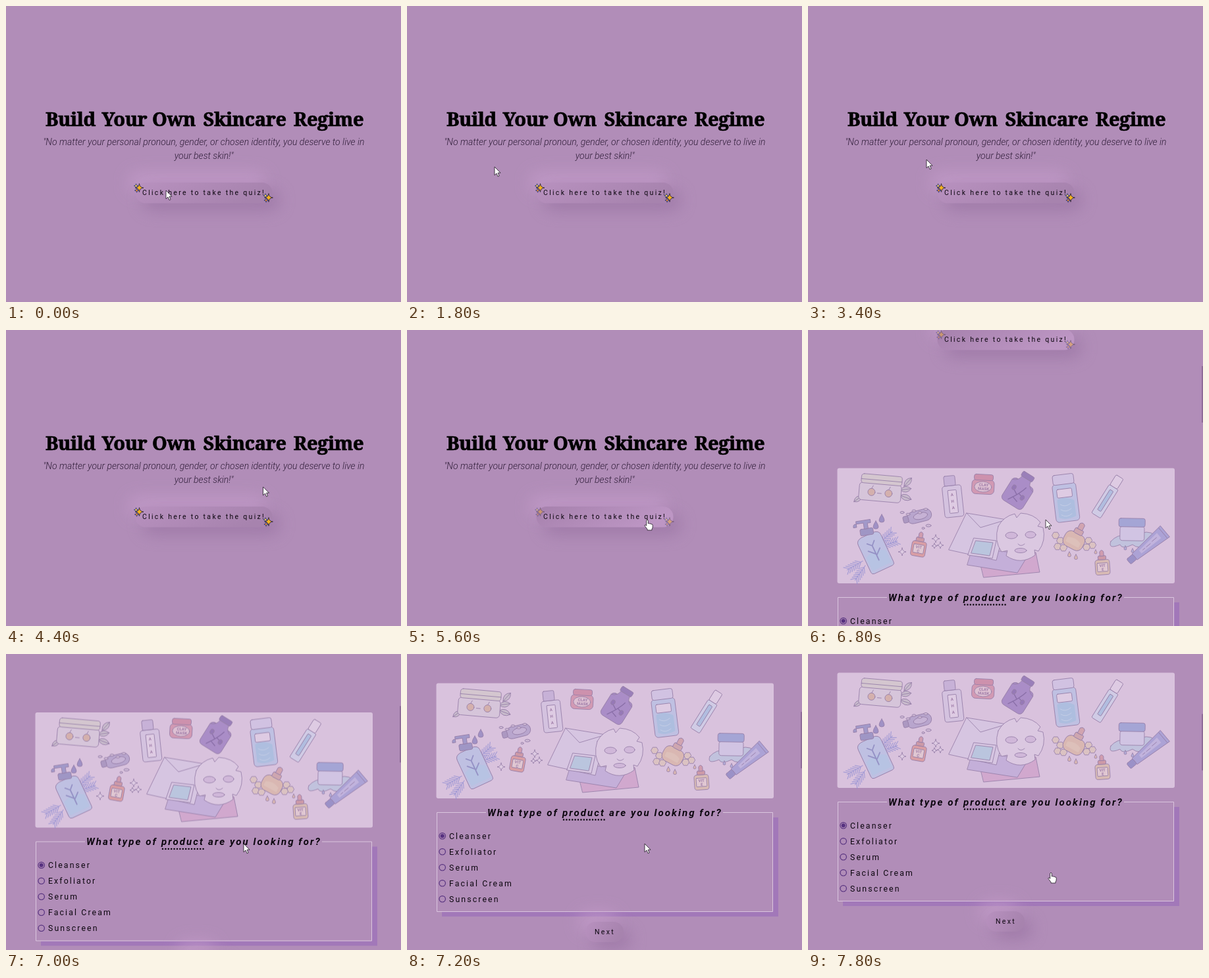
Write an HTML page that moves like this. It is 600x451 px and loops after 8 s.

```html
<!DOCTYPE html>
<html lang="en">
<head>
<meta charset="utf-8">
<title>Skincare quiz</title>
<style>
html, body { margin: 0; width: 100%; height: 100%; overflow: hidden; background: #b18db8; }
svg { display: block; width: 600px; height: 451px; }
text { font-family: Roboto, Arial, sans-serif; fill: #0d0710; }
.title text { font: 700 29px "Noto Serif", serif; letter-spacing: -.4px; text-anchor: middle; fill: #000; stroke: #000; stroke-width: .7px; }
.sub { font-size: 14px; font-weight: 300; font-style: italic; text-anchor: middle; fill: #33203c; }
.btn { font-size: 10.5px; letter-spacing: 2.31px; }
.legend text { font-size: 15px; font-weight: 700; font-style: italic; letter-spacing: 2.09px; }
.option { font-size: 12.3px; letter-spacing: 2.12px; }
.art { stroke: #7f6796; stroke-width: .85px; stroke-linejoin: round; stroke-linecap: round; opacity: .74; }
.art text { font-size: 6px; font-weight: 700; text-anchor: middle; stroke: none; fill: #8b6596; }
</style>
</head>
<body>
<svg id="stage" viewBox="0 0 600 451"></svg>
<script>
const stage = document.getElementById('stage');

// Markup helpers
const rect = (x, y, w, h, r, fill, more = '') =>
  `<rect x="${x}" y="${y}" width="${w}" height="${h}" rx="${r}" fill="${fill}" ${more}/>`;
const path = (d, fill = 'none', more = '') => `<path d="${d}" fill="${fill}" ${more}/>`;
const oval = (x, y, rx, ry, fill, more = '') =>
  `<ellipse cx="${x}" cy="${y}" rx="${rx}" ry="${ry}" fill="${fill}" ${more}/>`;
const text = (x, y, str, cls = '') => `<text x="${x}" y="${y}" class="${cls}">${str}</text>`;
const at = (x, y, turn, ...parts) =>
  `<g transform="translate(${x} ${y}) rotate(${turn})">${parts.join('')}</g>`;
const star = (x, y, r, fill, more = '') => {
  const k = r * .07;
  return at(x, y, 0, path(
    `M0 ${-r}Q${k} ${-k} ${r} 0Q${k} ${k} 0 ${r}Q${-k} ${k} ${-r} 0Q${-k} ${-k} 0 ${-r}z`, fill, more));
};
const drop = (x, y, r, fill) =>
  path(`M${x} ${y - r * 2}Q${x + r * 2} ${y + r} ${x} ${y + r}Q${x - r * 2} ${y + r} ${x} ${y - r * 2}z`, fill);
const leaf = (x, y, turn, fill, n = 14) =>
  at(x, y, turn, path(`M0 0Q${n / 2} ${-n / 2} ${n} 0Q${n / 2} ${n / 2} 0 0zM0 0H${n}`, fill));
const hexagon = (x, y, r, fill) => {
  const pts = Array.from({ length: 6 }, (_, i) =>
    [x + r * Math.cos(i * Math.PI / 3), y + r * Math.sin(i * Math.PI / 3)].map(v => v.toFixed(1)));
  return path('M' + pts.join('L') + 'z', fill);
};
const branch = (x, y, turn) => {
  let d = 'M0 0H27';
  for (let i = 3; i < 26; i += 4) d += `M${i} 0l7 -6M${i} 0l7 6`;
  return at(x, y, turn, path(d, 'none', 'stroke="#938fd2" stroke-width="1.2"'));
};

const button = (id, x, y, w, h) =>
  rect(x - 10, y - 15, w, h, 15, '#c79fce', 'filter="url(#soft)" opacity=".65"') +
  rect(x + 11, y + 11, w, h, 15, '#9671a0', 'filter="url(#soft)" opacity=".65"') +
  rect(x, y, w, h, 15.5, 'url(#rest)', `id="${id}"`);

const sparkles = (x, y) => at(x, y, 0,
  star(1.5, 0, 6.4, '#f7b21f', 'stroke="#2b2440" stroke-width=".9"'),
  star(-3.4, -3, 3.2, '#ffd34d', 'stroke="#2b3a78" stroke-width=".8"'),
  star(-2.4, 4, 3.2, '#f08a2c', 'stroke="#2b3a78" stroke-width=".8"'));

const vial = (fill, label) =>
  rect(-11, -5, 22, 23, 4, fill) + rect(-6, -11, 12, 6, 1.5, '#c98b94') +
  path('M-3 -11V-17Q0 -22 3 -17V-11z', '#cd8f9f') + rect(-8, 0, 16, 13, 1, '#e3c9cf') +
  text(0, 6, 'VIT') + text(0, 12, label);

function artwork() {
  const white = '#e0cee5', blue = '#b6c0e4', violet = '#9a7bc0', amber = '#d9b3a3';
  return '<g class="art">' + [
    // cream jar with apples and leaves
    leaf(140, 62, -8, '#c3b9c6', 17), leaf(146, 56, -48, '#c3b9c6', 17),
    leaf(140, 70, 20, '#c3b9c6', 18), leaf(82, 71, 145, '#c3b9c6', 15),
    at(110, 59, 5, rect(-32, -7, 64, 27, 5, '#d6c6da'), rect(-30, -20, 62, 14, 4, '#d2c8cb'),
      path('M-30 -12H32'), oval(-13, 7, 5.5, 5.5, '#d2aa9c'), oval(13, 7, 5.5, 5.5, '#d2aa9c'),
      path('M-13 1l2 -4M13 1l2 -4M-4 8h6')),
    // labelled bottle
    at(219, 72, -6, rect(-14, -17, 29, 48, 4, '#d2c2e0'), rect(-10, -32, 17, 15, 2, '#c1acd5'),
      rect(-6, -10, 13, 35, 1, white), text(0, -1, 'A'), text(0, 9, 'H'), text(0, 19, 'A')),
    // clay jar
    at(266, 53, 3, rect(-17, -7, 34, 22, 6, '#cf8ba4'), rect(-14, -15, 29, 9, 3, '#c9809c'),
      oval(0, 4, 13, 8, '#dfbfcf'), text(1, 3, 'CLAY'), text(1, 9, 'MASK')),
    // violet bottle
    at(319, 65, 32, rect(-18, -17, 37, 39, 6, violet), path('M-18 -12Q-8 -15 -8 -24H8Q8 -15 19 -12', violet),
      rect(-10, -32, 20, 8, 2, '#8468ad'), path('M-7 17Q4 0 7 -12M0 4l-10 -6M2 1l10 3M-3 10l9 3', 'none', 'stroke="#6f5296" stroke-width="1.4"'),
      oval(-9, -3, 3, 4, '#7f60a8'), oval(10, 4, 3, 4, '#7f60a8')),
    // tall pump
    at(390, 74, -7, rect(-17, -22, 36, 58, 5, blue), rect(-15, -36, 32, 15, 3, '#cfc3e4'),
      rect(-11, -14, 23, 13, 2, white), path('M-12 2Q0 -4 14 5V29Q0 35 -12 29z', '#9fbde0', 'stroke="none"'),
      path('M-8 9q7 6 16 0M-8 17q7 6 16 0M-8 25q7 6 16 0', 'none', 'stroke="#c0d4ea"')),
    // slim tube
    at(456, 71, 32, rect(-8, -16, 16, 51, 2, '#cdcfe8'), rect(-7, -34, 13, 18, 2, white),
      rect(-3, -10, 6, 36, 1, '#a3bbe0')),
    // tipped bottle and spill
    at(168, 102, -14, rect(-18, -9, 38, 18, 9, '#ad9bc8'), rect(-24, -5, 8, 10, 2, '#9c8ab8'),
      oval(3, 0, 11, 5, '#c0add3')),
    [0, 1, 2, 3, 4].map(i => oval(143 + i * 9, 96 - i * 1.2 + i % 2 * 4, 3, 1.7, '#c9b5d1')).join(''),
    oval(183, 116, 4, 2, '#c9b5d1'), oval(175, 120, 2, 1.5, '#c9b5d1'),
    // hand pump with pine
    branch(108, 143, -42), branch(110, 148, -18), branch(83, 170, 150), branch(87, 177, 125),
    drop(112, 107, 4, '#8c80bd'), drop(103, 117, 4, '#8c80bd'),
    at(101, 154, -25, path('M-19 -18Q-19 -25 -10 -26H10Q19 -25 19 -18V28Q19 32 15 32H-15Q-19 32 -19 28z', blue),
      path('M-16 5Q0 -4 16 7V27H-16z', '#abc4e5', 'stroke="none"'),
      path('M0 16V-8M0 6l-9 -9M0 8l9 -8M0 -8l-6 -6M0 -8l6 -6', 'none', 'stroke="#7d80bd" stroke-width="1.8"'),
      at(0, -26, 16, rect(-10, -10, 20, 10, 2, '#8b87bd'),
        path('M-3 -10V-19H-16Q-19 -19 -19 -14H-14V-23H8V-18H3V-10z', '#8f8bc2'))),
    // dropper vial
    at(169, 145, 10, vial('#d99191', 'C')),
    star(143, 156, 6, white), star(194, 136, 6, white), star(201, 146, 5, white), star(192, 147, 4, white),
    // sheet mask
    path('M258 158L346 157 352 187 267 195z', '#cf9fc9'), path('M250 150L335 160 318 188 242 176z', '#bda9d8'),
    path('M241 97L302 107 286 169 214 153z', '#d6c6e3'), path('M241 97L262 119 302 107'),
    path('M252 135L286 139 280 166 243 161z', '#d6c6e3'), path('M255 139L281 142 276 162 248 158z', '#b0c6df'),
    path('M289 117Q297 102 314 98L317 104 323 97Q343 98 353 111L349 117 357 119Q362 139 350 155L344 153 345 161Q323 177 301 162L303 154 294 156Q282 139 289 117z', '#dccae3'),
    oval(309, 131, 9, 5, '#cdb3d8'), oval(338, 130, 8, 5, '#cdb3d8'),
    oval(323, 154, 9, 3.5, '#cdb3d8'), path('M319 144Q323 149 329 144'),
    // honey dropper
    [[376, 131], [383, 139], [379, 148], [388, 150], [426, 139], [432, 146], [423, 149]]
      .map(([x, y]) => hexagon(x, y, 5.5, '#dcc3b9')).join(''),
    at(406, 135, 28, rect(-16, -8, 32, 25, 9, amber), rect(-7, -15, 14, 8, 2, '#cb9da0'),
      path('M-4 -15V-23Q0 -28 4 -23V-15z', '#cf9aa0'), path('M-11 4Q0 -2 11 4V11H-11z', '#dfc0ae', 'stroke="none"')),
    drop(397, 161, 2.5, amber), drop(407, 165, 2.5, amber), drop(437, 157, 2, amber),
    // small vial
    at(447, 173, -4, vial('#d8b8a6', 'E')),
    // jar on a splash
    path('M460 140Q470 129 483 131L514 126Q531 127 522 137 530 145 512 144 503 153 493 145 477 153 474 145 455 153 460 140z', '#b9c2dd'),
    at(492, 122, 1, rect(-18, -5, 37, 22, 4, '#cfc5e5'), rect(-20, -17, 40, 13, 3, '#929bd3')),
    drop(482, 151, 2, '#a5a5d5'), drop(493, 155, 2, '#a5a5d5'),
    // squeeze tube
    at(517, 146, -40, path('M-27 -6L33 -11V11L-27 6z', '#9c97d2'), rect(-39, -5, 12, 10, 2, '#8580bf'),
      path('M29 -10V10'), path('M-16 -3L22 -6V4L-16 3z', '#b9aedd', 'stroke="none"'),
      path('M-11 0h4M-4 0h8M8 -1h9'))
  ].join('') + '</g>';
}

const options = ['Cleanser', 'Exfoliator', 'Serum', 'Facial Cream', 'Sunscreen'];
const words = [['Build', 98], ['Your', 180], ['Own', 255], ['Skincare', 362.5], ['Regime', 490]];
const shades = (id, a, b) => `<linearGradient id="${id}" x2="1" y2=".3">
  <stop stop-color="${a}"/><stop offset="1" stop-color="${b}"/></linearGradient>`;

stage.innerHTML = `<defs>
  <filter id="soft" x="-60%" y="-150%" width="220%" height="400%"><feGaussianBlur stdDeviation="12"/></filter>
  ${shades('rest', '#b891bf', '#a783ae')}${shades('hover', '#a681ad', '#bd96c4')}
</defs>
${rect(0, 0, 600, 451, 0, '#b18db8')}
<g id="page">
  ${button('quiz', 196.5, 269, 208, 31.5)}
  <g class="title">${words.map(([w, x]) => text(x, 183, w)).join('')}</g>
  ${text(300.5, 212, '"No matter your personal pronoun, gender, or chosen identity, you deserve to live in', 'sub')}
  ${text(300.5, 233, 'your best skin!"', 'sub')}
  ${text(207, 288.4, 'Click here to take the quiz!', 'btn')}
  <g id="sparks">${sparkles(201, 277)}${sparkles(397.5, 292)}</g>
  <g transform="translate(0 452)">
    ${rect(44.5, 28.5, 512.5, 175.5, 3, '#d9c2dd')}
    ${artwork()}
    ${rect(53, 233, 511, 151, 0, '#a278b9')}
    ${rect(45, 225, 511, 152, 0, '#b18db8')}
    ${path('M120 225.5H45.5V376.5H555.5V225.5H480', 'none', 'stroke="#dac5de"')}
    <g class="legend">${text(122, 230.7, 'What type of')}${text(236, 230.7, 'product')}${text(307, 230.7, 'are you looking for?')}</g>
    ${path('M238 236.5H300', 'none', 'stroke="#0d0710" stroke-width="2.6" stroke-linecap="round" stroke-dasharray="0 4.4"')}
    ${options.map((o, i) => oval(53.7, 261.3 + i * 24, 4.7, 4.7, 'none', 'stroke="#56317f" stroke-width="1.2"') +
      text(64, 265.8 + i * 24, o, 'option')).join('')}
    ${oval(53.7, 261.3, 3, 3, '#56317f')}
    ${button('next', 271, 392, 58, 31)}
    ${text(285, 411, 'Next', 'btn')}
  </g>
</g>
${rect(598, 0, 2, 86, 0, '#8f6c98', 'id="thumb"')}
<g id="pointer" stroke="#1c1620" stroke-width=".8" stroke-linejoin="round">
  ${path('M0 0V12.8L3 10 5.1 14.8 7.1 13.9 5.1 9.2H9z', '#fff', 'id="arrow"')}
  ${path('M2.7 1.2Q4 -.9 5.3 1.2V6Q6.6 5 7.6 6.2 9 5.4 10 6.8 12 6.4 12.2 8.5V11Q12 13 11 14.2V16H4V14.5L0 9.3Q0 7.4 1.6 8.1L2.7 9.3z', '#fff', 'id="hand"')}
</g>`;

const [page, quiz, sparks, thumb, pointer, arrow, hand] =
  ['page', 'quiz', 'sparks', 'thumb', 'pointer', 'arrow', 'hand'].map(id => document.getElementById(id));

// Keys: time, then values
const moves = [
  [0, 243, 281], [400, 64, 190], [800, 527, 161], [1200, 244, 175], [1600, 106, 210],
  [2000, 160, 280], [2400, 200, 210], [2800, 76, 190], [3000, 220, 289], [3400, 180, 234],
  [3800, 83, 175], [4200, 481, 180], [4600, 300, 298], [5000, 101, 190], [5200, 160, 168],
  [5400, 396, 298], [5600, 361, 289], [7200, 361, 289], [7600, 365, 328], [7800, 365, 333]
];
const scrolls = [[6200, 0], [6400, 23], [6600, 138], [6800, 270], [7000, 391.5], [7200, 436], [7400, 449], [7600, 452]];

function sample(keys, t) {
  const i = keys.findIndex(k => k[0] > t);
  if (i < 0) return keys[keys.length - 1].slice(1);
  if (i === 0) return keys[0].slice(1);
  const a = keys[i - 1], b = keys[i], p = (t - a[0]) / (b[0] - a[0]);
  return a.slice(1).map((v, j) => v + (b[j + 1] - v) * p);
}

function draw(ms) {
  const t = Math.floor(ms % 8000 / 200) * 200;
  const [x, y] = sample(moves, t);
  const [scroll] = sample(scrolls, t);
  const over = t > 0 && t < 6600 && x > 196 && x < 405 && y > 268 && y < 301;
  const pointing = over || t === 6600 || t >= 7400;
  const active = over || t >= 5600;

  page.setAttribute('transform', `translate(0 ${-scroll})`);
  quiz.setAttribute('fill', active ? 'url(#hover)' : 'url(#rest)');
  sparks.setAttribute('opacity', active ? .42 : 1);
  thumb.setAttribute('y', 1 + scroll * .2);
  thumb.setAttribute('opacity', scroll > 0 ? 1 : 0);
  pointer.setAttribute('transform', `translate(${x} ${y})`);
  arrow.setAttribute('opacity', pointing ? 0 : 1);
  hand.setAttribute('opacity', pointing ? 1 : 0);
}

const start = performance.now();
function tick() {
  draw(performance.now() - start);
  requestAnimationFrame(tick);
}
tick();
</script>
</body>
</html>
```
